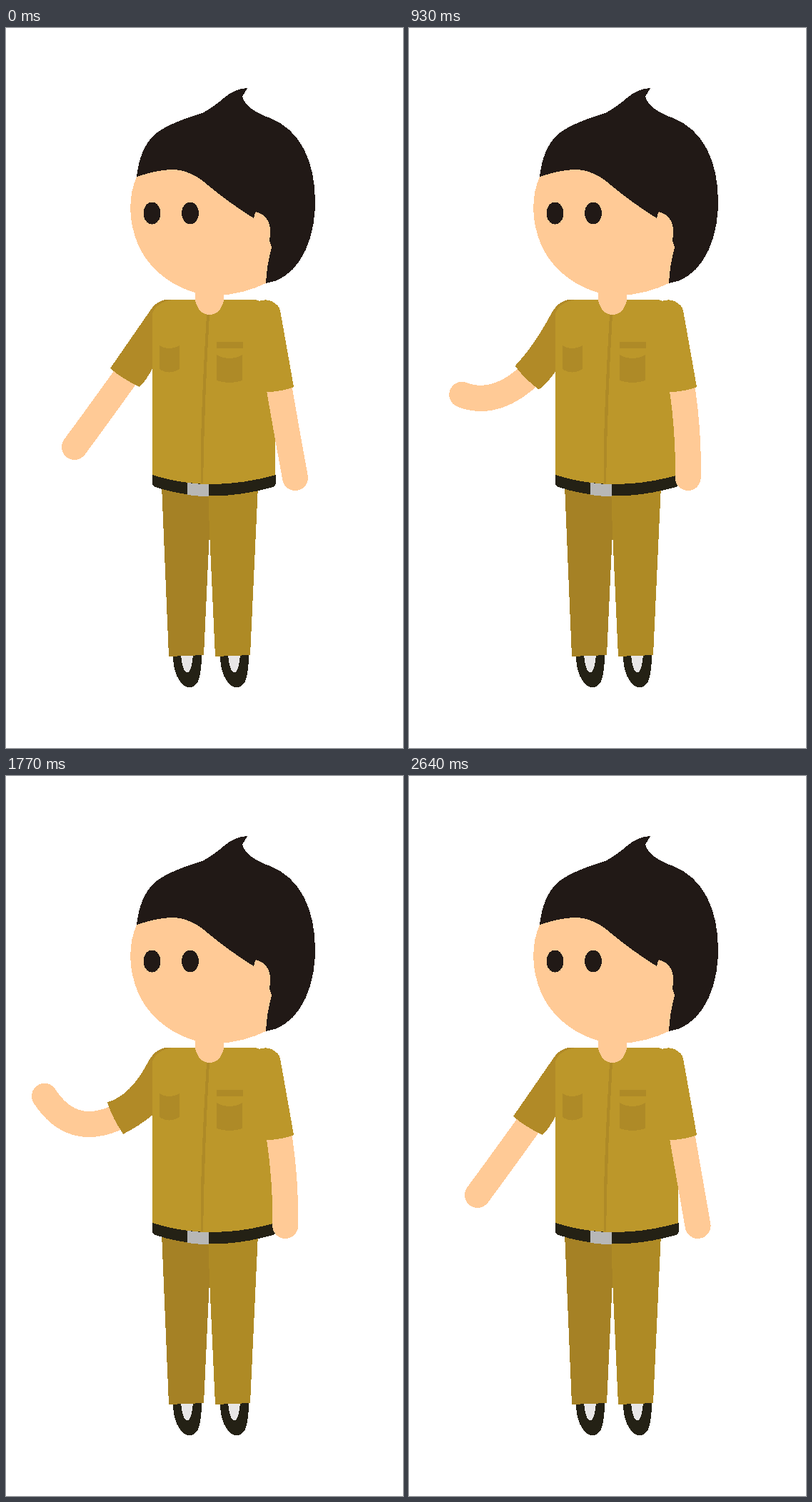
Write an HTML page that moves like this. It is 556 px wide and 1007 px high and loops after 2670 ms.

```html
<!DOCTYPE html>
<html lang="en">
<head>
<meta charset="utf-8">
<title>Man in uniform raising an arm</title>
<style>
  html, body { margin: 0; width: 100%; height: 100%; overflow: hidden; background: #fff; }
  svg { display: block; width: 100%; height: 100%; shape-rendering: crispEdges; }
  .skin { fill: #ffca96; }
  .arm { fill: none; stroke: #ffca96; stroke-width: 36; stroke-linecap: round; }
  .shirt { fill: #bc972a; }
  .sleeve { fill: #b18a27; }
  .fold { fill: #ae8a27; }
  .dark { fill: #242115; }
  .hair { fill: #211916; }
</style>
</head>
<body>
<svg viewBox="0 0 556 1007">
  <defs>
    <g id="shoe">
      <path class="dark" d="M234 877L274 876Q274 901 269 914Q257 931 244 914Q234 901 234 877Z"/>
      <path fill="#e8e6e6" d="M245 876H262Q260 901 254 901Q247 901 245 876Z"/>
    </g>
  </defs>

  <use href="#shoe"/>
  <use href="#shoe" x="66"/>
  <path fill="#a58125" d="M218 640L228 879L277 877L285 705V640Z"/>
  <path fill="#ae8a25" d="M283 640L285 705L293 879L342 877L353 640Z"/>

  <path class="arm" id="leftArm"/>
  <path class="sleeve" id="leftSleeve"/>

  <path class="shirt" d="M205 399Q211 383 234 380H350L377 390V630Q285 655 205 628Z"/>
  <path class="dark" d="M205 625Q285 651 378 625V636Q378 640 374 642Q285 667 209 642Q205 640 205 637Z"/>
  <path fill="#b7b7b7" d="M254 636Q269 638 284 638V655Q269 655 254 653Z"/>
  <path class="fold" d="M281 401H285Q278 520 276 637H273Q271 570 281 401Z"/>
  <path class="fold" d="M215 444Q228 452 243 444V477Q228 486 215 477Z"/>
  <path class="fold" d="M295 439H332V448H295ZM295 457Q313 467 331 457V493Q313 499 295 493Z"/>

  <path class="arm" id="rightArm"/>
  <path class="shirt" d="M350 384Q362 378 372 382Q383 388 384 395L403 502Q385 509 364 509L345 400Z"/>

  <path class="skin" d="M265 360V381Q270 401 285 401Q300 401 305 381V360Z"/>
  <path class="skin" d="M183 208C171 235 171 270 185 303C203 345 250 374 293 374C320 374 345 366 364 357L390 280L300 130L215 160Z"/>
  <path class="hair" d="M183 208Q187 170 207 150Q225 134 275 119Q290 111 305 98Q320 85 338 84L331 96Q336 114 370 126C411 142 433 185 433 243C433 305 405 352 364 357Q365 333 372 307L369 297Q375 264 350 257Q348 260 347 266Q310 243 277 215Q257 199 234 198Q213 198 183 208Z"/>
  <ellipse class="hair eye" cx="204.5" cy="259"/>
  <ellipse class="hair eye" cx="258" cy="259"/>
</svg>

<script>
const LOOP = 2670, STEP = 30;
const BENT = 1440, RAISED = 2150, REST = 2640, BLINK = 2340;

// Key poses of the raised arm; curl is how far the sleeve bows
const down   = { hand: [96, 586], elbow: [130, 540], outer: [146, 476], inner: [187, 502], curl: 0 };
const bent   = { hand: [60, 465], elbow: [102, 516], outer: [152, 468], inner: [175, 511], curl: 1 };
const raised = { hand: [47, 428], elbow: [79, 493],  outer: [130, 443], inner: [152, 489], curl: 1 };

const eyes = document.querySelectorAll('.eye');
const draw = (id, d) => document.getElementById(id).setAttribute('d', d);
const lerp = (a, b, k) => a + (b - a) * k;
const mix = (p, q, k) => p.map((v, i) => lerp(v, q[i], k));
const shift = ([x, y], dx, dy) => [x + dx, y + dy];

// The hand leads; the rest of the arm follows with its own progress
function blend(a, b, lead, follow = lead) {
  const part = name => mix(a[name], b[name], follow);
  return {
    hand: mix(a.hand, b.hand, lead),
    elbow: part('elbow'), outer: part('outer'), inner: part('inner'),
    curl: lerp(a.curl, b.curl, follow),
  };
}

function poseAt(t) {
  if (t < BENT) {
    const k = t / BENT;
    return blend(down, bent, k ** 1.15, k * k);
  }
  if (t < RAISED) return blend(bent, raised, (t - BENT) / (RAISED - BENT));
  return blend(raised, down, Math.min(1, (t - RAISED) / (REST - RAISED)));
}

function drawLeftArm({ hand, elbow, outer, inner, curl }) {
  const shoulder = [200, 398];
  const cuff = mix(outer, inner, 0.5);
  const bow = shift(mix(shoulder, outer, 0.5), 4 * curl, 20 * curl);
  const armpit = [205, 487 + 1.25 * (inner[1] - 511)];
  const under = shift(mix(inner, armpit, 0.5), 2, 2);
  draw('leftArm', `M${hand}Q${elbow} ${cuff}`);
  draw('leftSleeve', `M236 381Q214 375 ${shoulder}Q${bow} ${outer}` +
    `Q${shift(cuff, -3, 2)} ${inner}Q${under} ${armpit}H236Z`);
}

function render(t) {
  drawLeftArm(poseAt(t));

  // The other arm swings in and out at a constant rate
  const swing = 1 - Math.abs(1 - 2 * t / LOOP);
  draw('rightArm', `M382.5 503Q${393.5 - 2 * swing} 567 ${405 - 20.5 * swing} 629`);

  const size = 1 - 0.33 * Math.max(0, 1 - Math.abs(t - BLINK) / 150);
  for (const eye of eyes) {
    eye.setAttribute('rx', 12 * size);
    eye.setAttribute('ry', 15.5 * size);
  }
}

const start = performance.now();
function tick() {
  const t = (performance.now() - start) % LOOP;
  render(Math.floor(t / STEP) * STEP);
  requestAnimationFrame(tick);
}
tick();
</script>
</body>
</html>
```
